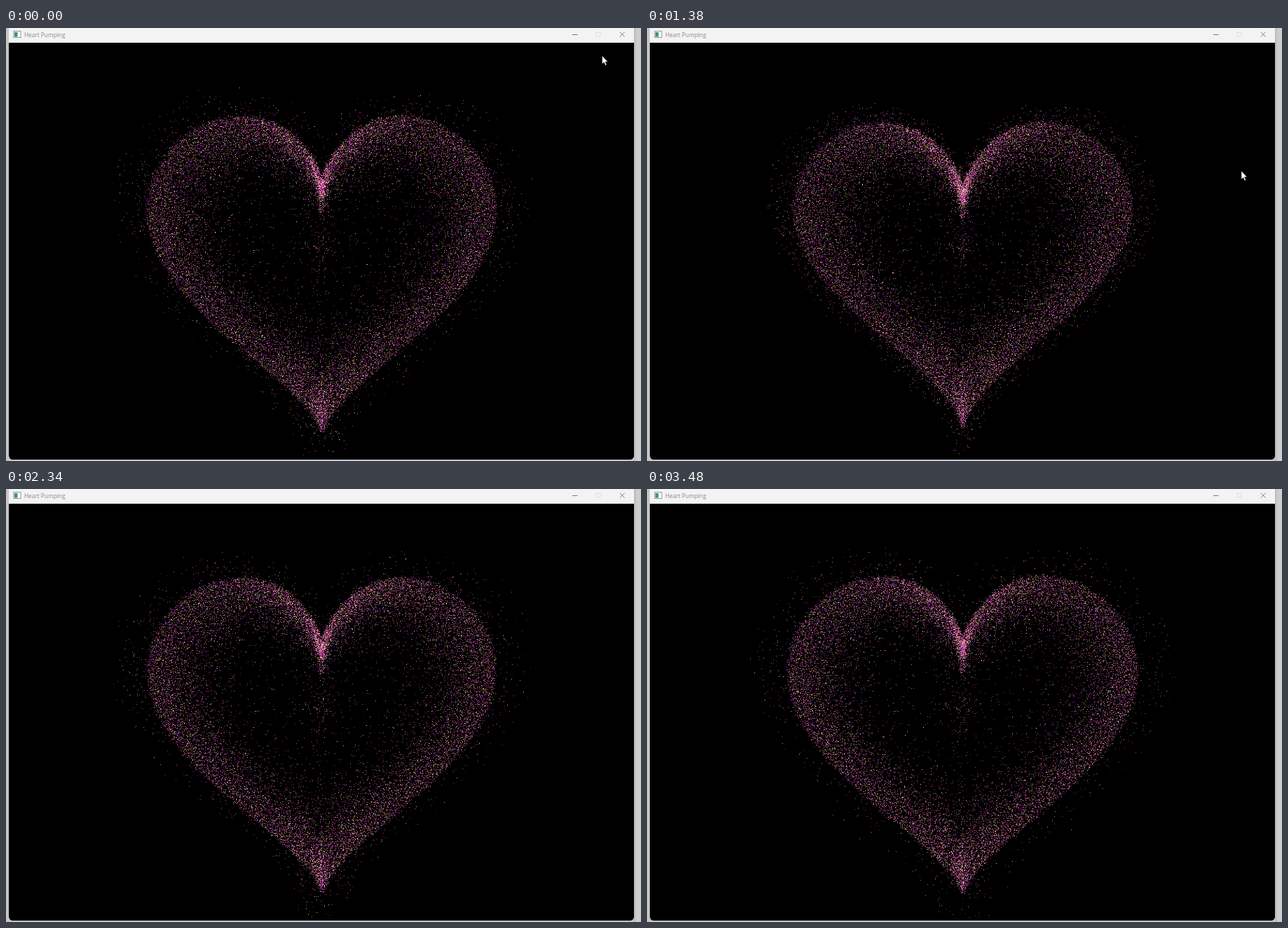
Recreate the animation shown at these times as an HTML page with a canvas. Size 906 px wide and 618 px high, loop 3.54 s.

```html
<!DOCTYPE html>
<html lang="en">
<head>
<meta charset="utf-8">
<title>Heart Pumping</title>
<style>
  html, body { margin: 0; width: 906px; height: 618px; overflow: hidden; background: #c6c6c6; }
  body { position: relative; }
  #edge { position: absolute; left: 896px; top: 0; width: 10px; height: 618px;
          background: linear-gradient(90deg, #b9b9b9, #cdcdcd 4px); }
  #window { position: absolute; left: 4px; top: -8px; width: 892px; height: 624px;
            border-radius: 0 0 6px 6px; overflow: hidden; background: #000; }
  #bar { height: 29px; background: #f3f3f3; }
  canvas { position: absolute; left: 0; top: 29px; }
  svg { position: absolute; left: 0; top: 0; }
  text { font: 8.3px "Open Sans", "Noto Sans", sans-serif; fill: #888; }
</style>
</head>
<body>
<div id="edge"></div>
<div id="window"><div id="bar"></div><canvas id="view" width="892" height="595"></canvas></div>
<svg width="906" height="618" fill="none">
  <rect x="11" y="4.5" width="10" height="9" fill="#fff" stroke="#8c9499"/>
  <rect x="12" y="6" width="4.5" height="6.5" fill="#3f8f88"/>
  <text x="26" y="12.8">Heart Pumping</text>
  <path d="M808 9.5h7.5" stroke="#777"/>
  <rect x="842" y="6" width="6" height="6" stroke="#dedede"/>
  <path d="M875.7 5.7l7 7m0-7l-7 7" stroke="#777" stroke-width=".9"/>
  <path id="cursor" d="M0 0v12l2.7-2.4 2 4.3 1.9-.8-2-4.3h3.6z" fill="#fff" stroke="#000" stroke-width=".5"/>
</svg>
<script>
const W = 1200, H = 800, POSES = 20, STEP = 60, STEPS = 59;
const COLORS = ['ff00ff', 'f01ee0', 'ff3ce6', 'ff82f0', 'ffc8f5', 'fff0f5', 'ffff78', 'f0e678', 'ffb464', 'ff3c78']
  .map(c => 0xff000000 + parseInt(c.slice(4) + c.slice(2, 4) + c.slice(0, 2), 16));

// [step, pose] and [step, x, y]
const BEAT = [[0, 12], [3, 0], [7, 17], [11, 0], [16, 17], [18, 14], [23, 3], [24, 0], [32, 9],
  [36, 19], [39, 11], [44, 0], [52, 6], [54, 11], [56, 19], [58, 13], [59, 12]];
const POINTER = [[0, 850.5, 39.5], [9, 827, 85], [16, 773, 154.5], [18, 785, 166],
  [23, 848, 204], [27, 858, 214], [29, 910, 235], [59, 910, 235]];

let seed = 20221;
function random() {
  seed = (seed + 0x6d2b79f5) | 0;
  let t = Math.imul(seed ^ seed >>> 15, 1 | seed);
  t ^= t + Math.imul(t ^ t >>> 7, 61 | t);
  return ((t ^ t >>> 14) >>> 0) / 4294967296;
}
const jitter = r => Math.round((random() * 2 - 1) * r);
const pickColor = () => COLORS[Math.floor(random() * COLORS.length)];
// Whole percents, so even a tiny chance comes true about once in a hundred
const happens = chance => Math.floor(random() * 101) / 100 < chance;

// Heart curve sampled at roughly even spacing
function heartOutline() {
  const outline = [];
  let px = 0, py = 0;
  for (let a = 0.1; a <= 2 * Math.PI; a += 0.005) {
    const x = 16 * Math.sin(a) ** 3;
    const y = 13 * Math.cos(a) - 5 * Math.cos(2 * a) - 2 * Math.cos(3 * a) - Math.cos(4 * a);
    if (Math.hypot(x - px, y - py) > 0.162) outline.push([px = x, py = y]);
  }
  return outline;
}

function buildPoses() {
  const outline = heartOutline(), dots = [], poses = [];
  for (let size = 0.1; size <= 20.01; size += 0.1) {
    const chance = 1 / (1 + Math.exp(8 - size / 2));
    for (const [x, y] of outline)
      if (happens(chance))
        dots.push({ x: size * x + jitter(4), y: size * y + jitter(4), color: pickColor() });
  }
  for (let pose = 0; pose < POSES; pose++) {
    const canvas = document.createElement('canvas');
    canvas.width = W;
    canvas.height = H;
    const ctx = canvas.getContext('2d'), image = ctx.createImageData(W, H);
    const pixels = new Uint32Array(image.data.buffer).fill(0xff000000);
    const plot = (x, y, color) => {
      x = Math.floor(W / 2 + x);
      y = Math.floor(H / 2 - 3 - y);
      if (x >= 0 && x < W && y >= 0 && y < H) pixels[y * W + x] = color;
    };
    for (const dot of dots) {
      const d = Math.hypot(dot.x, dot.y) || 1;
      const grow = 1 + (-0.0009 * d * d + 0.35714 * d + 5) / d / POSES;
      dot.x *= grow;
      dot.y *= grow;
      plot(dot.x, dot.y, dot.color);
    }
    // Loose sparks around the edge scatter wider as the heart swells
    for (let i = 0; i < 20; i++) {
      const size = 17 + i * 0.3, outer = i >= 10;
      const spread = outer ? pose * pose / 5 + 15 : 5;
      for (const [x, y] of outline)
        if (happens(outer ? 0.4 : 0.05))
          plot(x * size + jitter(spread), y * size + jitter(spread), pickColor());
    }
    ctx.putImageData(image, 0, 0);
    poses.push(canvas);
  }
  return poses;
}

function sample(keys, step) {
  const i = keys.findIndex(k => k[0] > step), a = keys[i - 1], b = keys[i];
  const f = (step - a[0]) / (b[0] - a[0]);
  return a.slice(1).map((v, j) => v + (b[j + 1] - v) * f);
}

const poses = buildPoses();
const view = document.getElementById('view').getContext('2d');
const cursor = document.getElementById('cursor');
let shown = -1;

function draw(elapsed) {
  const step = Math.floor(Math.max(0, elapsed) / STEP) % STEPS;
  if (step === shown) return;
  shown = step;
  view.drawImage(poses[Math.round(sample(BEAT, step)[0])], 0.5, 0, 892, 595);
  cursor.setAttribute('transform', `translate(${sample(POINTER, step)})`);
}

const start = performance.now();
function tick() {
  draw(performance.now() - start);
  requestAnimationFrame(tick);
}
tick();
</script>
</body>
</html>
```
